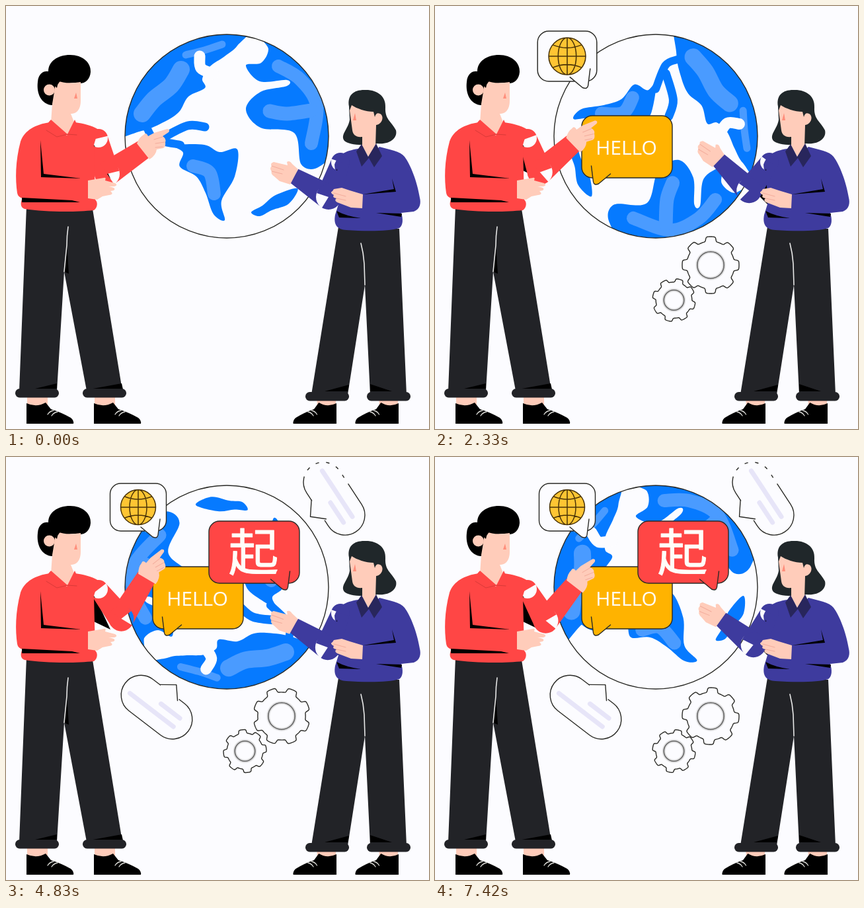
Animation, 640 px wide and 640 px high, one loop 7510 ms. Source, as an HTML page with a canvas:

```html
<!DOCTYPE html>
<html lang="en">
<head>
<meta charset="utf-8">
<style>
  html, body { margin: 0; height: 100%; overflow: hidden; background: #fcfcff; }
  canvas { display: block; width: 100vw; height: 100vh; }
</style>
</head>
<body>
<canvas id="stage" width="640" height="640"></canvas>
<script>
const ctx = document.getElementById('stage').getContext('2d');
const LOOP = 7510, STEPS = 90, FPS = 12, TAU = Math.PI * 2;
const PAPER = '#fcfcff', INK = '#2a2a26', CLOTH = '#222327', HAIR = '#20272a', SKIN = '#ffccba',
  CREASE = '#f2ac9c', NOSE = '#ff8f7c', RED = '#ff4645', PURPLE = '#3e3b9e', BLUE = '#067aff',
  SKY = '#4a9bff', BAR = '#e7e5f8', YELLOW = '#ffb300';

const fill = (color, d) => { ctx.fillStyle = color; ctx.fill(new Path2D(d)); };
const line = (color, width, d) => {
  ctx.strokeStyle = color; ctx.lineWidth = width; ctx.stroke(new Path2D(d));
};
const shape = (color, d) => { fill(color, d); line(INK, 1.4, d); };
const disc = (x, y, r) => `M${x - r} ${y}a${r} ${r} 0 1 0 ${2 * r} 0a${r} ${r} 0 1 0 ${-2 * r} 0Z`;
const box = (x, y, w, h, r) =>
  `M${x + r} ${y}h${w - 2 * r}a${r} ${r} 0 0 1 ${r} ${r}v${h - 2 * r}a${r} ${r} 0 0 1 ${-r} ${r}` +
  `h${2 * r - w}a${r} ${r} 0 0 1 ${-r} ${-r}v${2 * r - h}a${r} ${r} 0 0 1 ${r} ${-r}Z`;

// Draws around a local origin at x, y
function place(draw, x, y, scale = 1, angle = 0) {
  ctx.save();
  ctx.translate(x, y);
  ctx.rotate(angle);
  ctx.scale(scale, scale);
  draw();
  ctx.restore();
}

// Smooth curve through a few key points
function curve(p, closed) {
  const n = p.length / 2;
  const at = i => {
    const k = closed ? (i + n) % n : Math.max(0, Math.min(n - 1, i));
    return [p[2 * k], p[2 * k + 1]];
  };
  let d = `M${p[0]} ${p[1]}`;
  for (let i = 0; i < n - !closed; i++) {
    const [a, b, c, e] = [at(i - 1), at(i), at(i + 1), at(i + 2)];
    d += `C${b[0] + (c[0] - a[0]) / 6} ${b[1] + (c[1] - a[1]) / 6} ` +
      `${c[0] - (e[0] - b[0]) / 6} ${c[1] - (e[1] - b[1]) / 6} ${c[0]} ${c[1]}`;
  }
  return d;
}
const land = (...p) => fill(BLUE, curve(p, true));
const ridge = (color, width, ...p) => line(color, width, curve(p));

function continents() {
  land(365,30, 350,60, 331,76, 308,92, 297,110, 301,124, 276,137, 262,160, 240,175, 205,189,
    150,195, 170,90, 260,20);
  land(255,211, 300,210, 323,221, 350,217, 346,258, 326,295, 331,324, 314,315, 302,283, 288,258,
    263,243, 268,222);
  land(385,40, 397,65, 386,86, 363,90, 384,114, 425,112, 425,121, 385,130, 363,156, 385,184, 436,192,
    447,240, 474,243, 500,205, 500,90);
  land(371,312, 388,302, 408,286, 441,276, 428,299, 402,309, 384,318);
  ridge(BLUE, 12, 214,186, 226,202, 264,210);
  ridge(BLUE, 13, 238,199, 275,181, 301,183);
  ridge(SKY, 26, 206,163, 224,141, 250,120, 265,96);
  ridge(SKY, 11, 272,74, 300,67, 327,58);
  ridge(SKY, 20, 283,242, 308,252, 315,284);
  ridge(SKY, 20, 412,91, 445,111, 470,150, 462,208);
  ridge(SKY, 21, 399,159, 425,163, 462,158);
  ridge(PAPER, 17, 293,76, 295,94, 314,103);
}

function globe(angle) {
  const rim = disc(0, 0, 154);
  fill(PAPER, rim);
  ctx.save();
  ctx.clip(new Path2D(rim));
  ctx.rotate(angle);
  ctx.translate(-334, -197);
  continents();
  ctx.restore();
  line(INK, 1.4, rim);
}

function gear(r, angle) {
  let d = '';
  for (let a = 0; a < TAU; a += TAU / 240) {
    const radius = r * (.92 + .08 * Math.tanh(4 * Math.cos(8 * (a - angle))));
    d += `${d ? 'L' : 'M'}${radius * Math.cos(a)} ${radius * Math.sin(a)}`;
  }
  shape(PAPER, d + 'Z');
  line('#dededf', 5, disc(0, 0, r * .47));
  line('#666', 1.6, disc(0, 0, r * .47));
}

// Speech card around the origin; the tail hangs at tailX and leans to one side
function card(color, w, h, tailX, side) {
  const x = dx => tailX + side * dx, y = h / 2;
  shape(color, box(-w / 2, -y, w, h, 16));
  line(color, 3, `M${x(2)} ${y}H${x(17)}`);
  shape(color, `M${x(-4)} ${y - 18}L${x(-1)} ${y + 6}Q${x(0)} ${y + 12} ${x(7)} ${y + 9}L${x(25)} ${y - 6}`);
}

function label(text, y, font, weight) {
  ctx.font = font;
  ctx.textAlign = 'center';
  ctx.fillStyle = ctx.strokeStyle = '#fffdf8';
  ctx.lineWidth = weight;
  ctx.fillText(text, -1, y);
  ctx.strokeText(text, -1, y);
}

function helloCard() {
  card(YELLOW, 137, 94, -50, 1);
  label('HELLO', 11.5, '30px "Open Sans", "Noto Sans", sans-serif', .1);
}

function riseCard() {
  card(RED, 137, 94, 50, -1);
  label('起', 28, '76px "Noto Sans CJK SC", "Noto Sans CJK", "Noto Sans CJK JP", sans-serif', 1);
}

function webCard() {
  card(PAPER, 85, 72, 29, -1);
  fill('#ffc533', disc(0, 0, 26.5));
  line('#4a3408', 1.5, disc(0, 0, 26.5) + 'M0 -26.5v53M-26.5 0h53' +
    'M0 -26.5a13 26.5 0 0 0 0 53a13 26.5 0 0 0 0 -53M-20 -16Q0 -8 20 -16M-20 16Q0 8 20 16');
}

// Pale capsule; side -1 turns the tail over
function pill(side, worn) {
  ctx.scale(1, side);
  shape(PAPER, box(-60, -30, 120, 60, 30));
  line(PAPER, 3, 'M-14 -30H18');
  shape(PAPER, 'M-17 -30L3 -45L19 -27');
  line(BAR, 7, 'M-45 8H38M2 -8H38');
  if (!worn) return;
  ctx.setLineDash([7, 9]);
  line(PAPER, 4, 'M-54 -18A30 30 0 0 0 -30 30H-8');
  ctx.setLineDash([]);
}

const mix = (a, b, p) => a.map((v, i) => v + (b[i] - v) * p);

function limb([x1, y1], r1, [x2, y2], r2) {
  const a = Math.atan2(y2 - y1, x2 - x1), s = Math.sin(a), c = Math.cos(a);
  return disc(x1, y1, r1) +
    `M${x1 - s * r1} ${y1 + c * r1}L${x1 + s * r1} ${y1 - c * r1}L${x2 + s * r2} ${y2 - c * r2}L${x2 - s * r2} ${y2 + c * r2}Z`;
}

// Hands are drawn with the wrist at the origin
function arm(color, shoulder, elbow, wrist, cuff, turn, hand, creases) {
  fill(color, limb(shoulder, 14, elbow, 19));
  fill(color, limb(elbow, 19, wrist, cuff));
  place(() => { fill(SKIN, hand); line(CREASE, 1, creases); }, ...wrist, 1, turn);
}

function shoe(x, side) {
  ctx.save();
  ctx.translate(x, 632);
  ctx.scale(side, 1);
  fill(SKIN, 'M1 -40H32V-22H1Z');
  fill('#000', 'M0 0V-31Q15 -24 29 -32L37 -22Q53 -17 67 -9Q72 -5 71 0Z');
  line('#dcdcd8', 1.3, 'M32 -14Q35 -19 41 -20M38 -12Q41 -17 47 -18');
  ctx.restore();
}

function trousers(outline, shade, seam, cuffs, y) {
  fill(CLOTH, outline);
  fill('#000', shade);
  line('#e8e8e8', 1.6, seam);
  cuffs.forEach(x => fill(CLOTH, box(x, y, 66, 13.5, 6.5)));
}

function man(p) {
  shoe(31, 1);
  shoe(133, 1);
  trousers('M31 303L131 307L176 582H122L88 402L77 582H20Z',
    'M92 360L88 402L95 405ZM77 571L44 579H77ZM175 571L126 580H177Z',
    'M94 334Q92 348 92 362L88 402', [14, 116], 579);
  fill('#000', 'M132 208L141 225L158 261L133 249Z');
  arm(RED, [140, 200], mix([153, 254], [176, 244], p), mix([208, 217], [213, 179], p), 15, -.39 * p,
    'M-10 -9Q-6 -19 0 -22Q4 -27 7 -20L16 -25L36 -31Q41 -30 38 -26L29 -20Q35 -16 33 -11Q34 -4 30 -2' +
    'L20 0Q19 9 9 15Z', 'M16 -15L29 -19M18 -9L32 -11M18 -3L29 -4');

  fill(RED, 'M66 176C45 179 28 188 22 205C14 235 14 262 17 283Q18 289 25 291C21 298 22 305 28 307' +
    'C60 312 105 312 133 309C139 305 139 296 135 293L133 210L140 187C128 180 118 178 104 176L92 196Z');
  fill('#000', 'M52 203L57 254L114 261L53 259ZM24 290L100 294L112 297L24 297Z');
  fill(SKIN, 'M124 264L148 260Q152 259 150 264L165 268Q170 271 164 273L155 273Q168 275 163 279' +
    'L158 280Q164 285 156 286L146 288L138 293L124 291Z');

  fill('#000', 'M70 150C53 149 46 132 48 115C49 102 57 98 64 99C64 84 78 74 97 74C116 74 129 86 128 100' +
    'C127 113 117 120 105 116L78 118Z');
  fill(SKIN, 'M76 112C90 119 103 116 113 115V143C113 158 106 163 98 163L104 178L92 195L68 177L70 148Z');
  fill(SKIN, disc(65.5, 127, 8.5));
  fill('#000', 'M72 104L90 110Q78 113 77 124L72 119Z');
  fill(NOSE, 'M106 131L103 140H108Z');
  fill(RED, 'M60 188Q61 178 68 172L93 194L104 172Q111 184 107 196L93 195L77 199Z');
  line('#d93a38', 1, 'M61 188L77 198L93 194L107 195');
}

function woman(p) {
  shoe(500, -.92);
  shoe(594, -.92);
  trousers('M503 334L595 337L606 588H551L543 422L517 588H462Z',
    'M519 573L482 583H517ZM551 572L584 583H551Z',
    'M537 359Q541 374 542 390L543 422', [453, 546], 584);
  fill(PURPLE, 'M533 216C512 219 502 226 497 240L503 300L498 316C495 332 502 338 515 339' +
    'C545 341 580 341 595 336C601 332 601 322 598 313L617 311C627 307 628 298 626 290' +
    'C622 265 612 240 603 228C597 220 580 217 565 213L548 230Z');
  fill('#000', 'M501 246L487 284L503 300ZM584 261L590 281L540 285L587 277ZM500 310Q515 318 537 321L504 320ZM560 313L599 314L598 319Z');
  arm(PURPLE, [506, 236], mix([488, 289], [471, 276], p), mix([436, 257], [427, 225], p), 12, .38 * p,
    'M6 -10L-3 -18Q-7 -24 -11 -21L-10 -16L-31 -21Q-37 -19 -34 -15Q-38 -11 -34 -7Q-36 -3 -30 1' +
    'L-22 8L-6 13Z', 'M-34 -15L-16 -9M-34 -7L-18 -3');
  fill(SKIN, 'M496 277L508 275L520 279L540 285L539 306L522 305L501 297Q496 294 500 291Q493 290 496 286Q489 282 494 280Z');
  line(CREASE, 1, 'M496 283L514 288M500 291L514 294');

  fill(HAIR, 'M519 152C516 135 526 127 542 127C562 126 575 137 574 153C573 172 583 174 590 188' +
    'C593 200 580 210 562 208C540 212 518 210 512 204C505 195 518 186 520 172Z');
  fill(SKIN, 'M523 150C530 155 545 160 556 160L558 168Q560 160 566 163C573 167 569 179 560 180L559 213L549 229' +
    'L539 212V198C530 199 525 195 524 188L520 158Z');
  fill(NOSE, 'M528 162L525 173H530Z');
  fill('#28265c', 'M538 209L530 220L538 243L549 230L557 244L569 227L560 208L548 228Z');
}

// Grows in with a small overshoot
function pop(time, start) {
  const u = Math.min((time - start) / .75, 1) - 1;
  return u <= -1 ? 0 : 1 + 2.70158 * u ** 3 + 1.70158 * u ** 2;
}

function render() {
  const now = performance.now() % LOOP;
  const time = Math.min(Math.floor(now / LOOP * STEPS + .2), STEPS - 1) / FPS;
  const swing = from => time < from ? 0 : (1 - Math.cos(Math.PI * (time - from))) / 2;
  const turn = time * TAU / 8;

  ctx.lineCap = ctx.lineJoin = 'round';
  ctx.fillStyle = PAPER;
  ctx.fillRect(0, 0, 640, 640);

  place(() => globe(Math.max(0, turn - .08)), 334, 197);
  place(() => gear(32.5, .53 - turn), 361.5, 445, pop(time, .15));
  place(() => gear(43, .53 + turn), 417, 392, pop(time, .77));
  place(() => pill(-1, true), 496.5, 63, pop(time, 2.45), .99);
  place(() => pill(1, false), 228, 378.5, pop(time, 3.15), .655);
  place(webCard, 200, 76, pop(time, 1.75));
  place(helloCard, 290.5, 213, pop(time, 1.35));
  place(riseCard, 375.5, 144, pop(time, 3.75));
  man(swing(0));
  woman(swing(1));
  requestAnimationFrame(render);
}
render();
</script>
</body>
</html>
```
